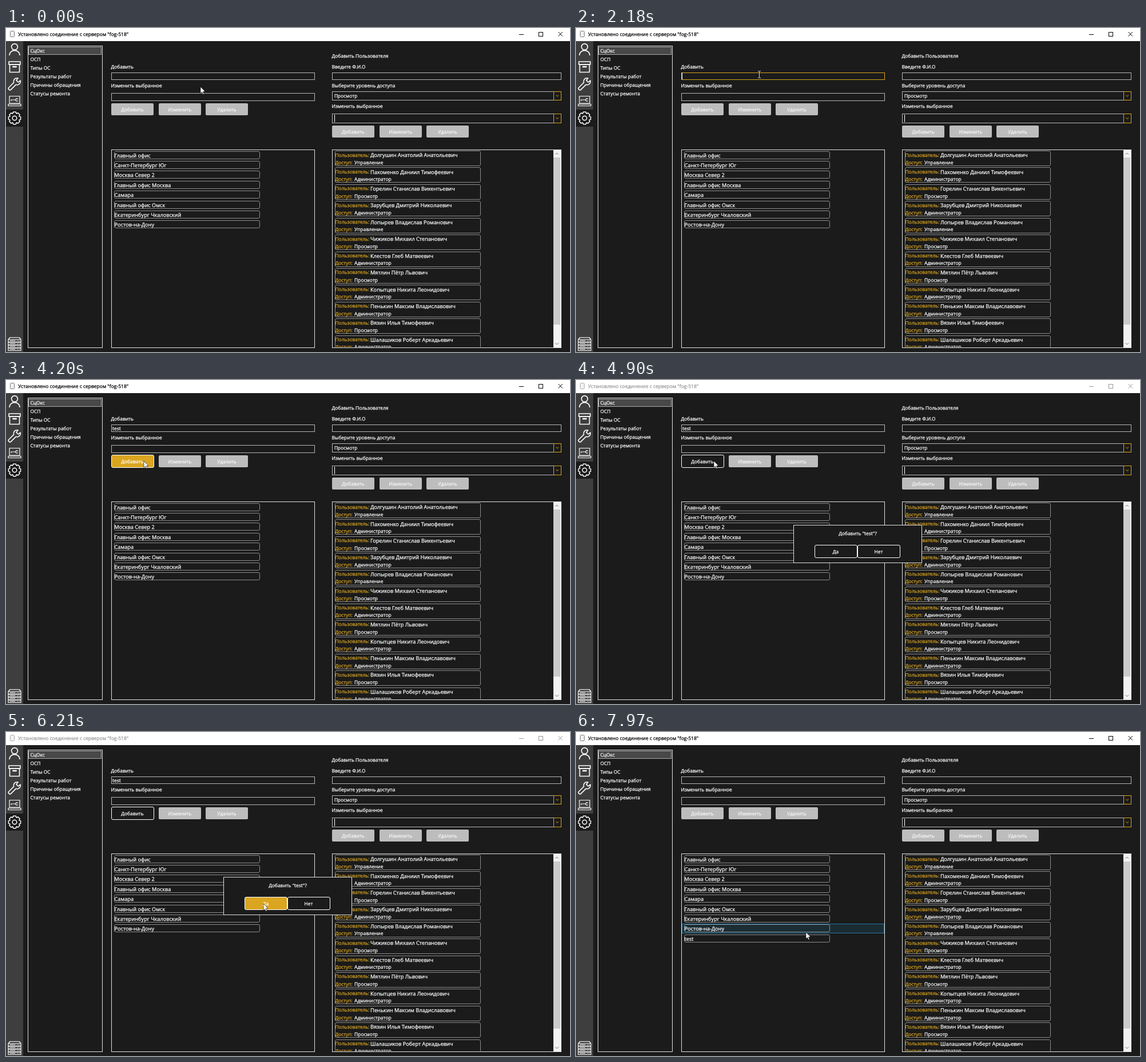
Animation, 986 px wide and 568 px high, one loop 8000 ms. Source, as an HTML page with a canvas:

```html
<!DOCTYPE html>
<html lang="ru">
<head>
<meta charset="utf-8">
<title>Настройки</title>
<style>
html, body { margin: 0; width: 100%; height: 100%; overflow: hidden; background: #1b1b1b; }
canvas { display: block; }
</style>
</head>
<body>
<canvas id="stage" width="986" height="568"></canvas>
<script>
const ctx = document.getElementById('stage').getContext('2d');
const LOOP = 8000;
const BG = '#1b1b1b', WHITE = '#fff', GOLD = '#daa520', FRAME = '#8c8c8c';
const FIELD = '#b8b8b8', PANEL = '#e2e2e2';
const SMALL = 8.4, LARGE = 9.2;
const ROW = 17.4, ROW_TOP = 214.5;

const menu = ['СцОкс', 'ОСП', 'Типы ОС', 'Результаты работ', 'Причины обращения', 'Статусы ремонта'];
const offices = ['Главный офис', 'Санкт-Петербург Юг', 'Москва Север 2', 'Главный офис Москва', 'Самара',
  'Главный офис Омск', 'Екатеринбург Чкаловский', 'Ростов-на-Дону'];
const actions = ['Добавить', 'Изменить', 'Удалить'];
const roles = { a: 'Администратор', m: 'Управление', v: 'Просмотр' };
const users = [
  ['Долгушин Анатолий Анатольевич', 'm'], ['Пахоменко Даниил Тимофеевич', 'a'],
  ['Горелин Станислав Викентьевич', 'v'], ['Зарубцев Дмитрий Николаевич', 'a'],
  ['Лопырев Владислав Романович', 'm'], ['Чижиков Михаил Степанович', 'v'],
  ['Клестов Глеб Матвеевич', 'a'], ['Мятлин Пётр Львович', 'v'],
  ['Копытцев Никита Леонидович', 'a'], ['Пенькин Максим Владиславович', 'a'],
  ['Вязин Илья Тимофеевич', 'v'], ['Шалашиков Роберт Аркадьевич', 'a']
];

// time, x, y of the pointer
const pointerKeys = [
  [0, 340, 103], [29, 340, 103], [30, 339, 101], [400, 339, 101], [700, 321, 87], [1040, 321, 87],
  [1100, 320, 81], [3560, 320, 81], [3900, 257, 139], [4200, 241, 142], [5550, 241, 142],
  [5950, 448, 308], [6210, 450, 301], [7650, 450, 301], [7970, 402, 351], [8000, 402, 351]
];
const typed = [[2240, 't'], [2320, 'te'], [2420, 'tes'], [2540, 'test'], [6920, '']];

const within = (t, a, b) => t >= a && t < b;
const clamp = v => Math.max(0, Math.min(1, v));
const ease = u => u * u * (3 - 2 * u);

function pointerAt(t) {
  const i = Math.max(1, pointerKeys.findIndex(k => k[0] > t));
  const [t0, x0, y0] = pointerKeys[i - 1], [t1, x1, y1] = pointerKeys[i];
  const u = ease(clamp((t - t0) / (t1 - t0)));
  return { x: x0 + (x1 - x0) * u, y: y0 + (y1 - y0) * u };
}

// a hairline stroke gives the small type its weight
function text(str, x, cy, color = WHITE, size = SMALL, align = 'left') {
  ctx.font = `${size}px "Open Sans", "Noto Sans", sans-serif`;
  ctx.textRendering = 'geometricPrecision';
  ctx.textAlign = align;
  ctx.fillStyle = ctx.strokeStyle = color;
  ctx.lineWidth = .25;
  ctx.fillText(str, x, cy + 3);
  ctx.strokeText(str, x, cy + 3);
}

function fill(x, y, w, h, color) {
  ctx.fillStyle = color;
  ctx.fillRect(x, y, w, h);
}

// one-pixel frame, right and bottom edges included
function frame(x, y, r, b, color = WHITE) {
  ctx.strokeStyle = color;
  ctx.lineWidth = 1;
  ctx.strokeRect(x + .5, y + .5, r - x, b - y);
}

function rounded(x, y, w, h, radius, stroke, back) {
  ctx.beginPath();
  ctx.roundRect(x, y, w, h, radius);
  if (back) { ctx.fillStyle = back; ctx.fill(); }
  if (stroke) { ctx.strokeStyle = stroke; ctx.lineWidth = 1; ctx.stroke(); }
}

function lines(points, color, width = 1) {
  ctx.beginPath();
  points.forEach(([x, y], i) => i ? ctx.lineTo(x, y) : ctx.moveTo(x, y));
  ctx.strokeStyle = color;
  ctx.lineWidth = width;
  ctx.stroke();
}

function button(x, y, label, state) {
  if (state === 'off') rounded(x, y, 74, 21, 2, null, '#bdbdbd');
  else rounded(x + .5, y - .5, 74, 22, 2.5, WHITE, state === 'hover' ? GOLD : BG);
  text(label, x + 37, y + 11, state === 'off' ? '#f6f6f6' : WHITE, SMALL, 'center');
}

function titleBar(active) {
  const ink = active ? '#000' : '#999';
  fill(0, 0, 986, 23, WHITE);
  rounded(7.5, 5.5, 7, 10, 1, active ? '#777' : '#aaa', '#f4f4ee');
  text('Установлено соединение с сервером "fog-518"', 21, 11, ink, 8.5);
  lines([[897, 11.5], [905, 11.5]], ink);
  frame(931, 7, 938, 14, ink);
  lines([[965.5, 7], [973, 14.5]], ink);
  lines([[973, 7], [965.5, 14.5]], ink);
}

function gear(cx, cy) {
  ctx.beginPath();
  for (let k = 0; k < 8; k++) {
    const a = k * Math.PI / 4;
    for (const [da, r] of [[-.33, 8.9], [-.22, 10.9], [.22, 10.9], [.33, 8.9]])
      ctx.lineTo(cx + r * Math.cos(a + da), cy + r * Math.sin(a + da));
  }
  ctx.closePath();
  ctx.stroke();
  ctx.beginPath();
  ctx.arc(cx, cy, 3.8, 0, 7);
  ctx.stroke();
}

function wrench(cx, cy) {
  ctx.save();
  ctx.translate(cx, cy);
  ctx.rotate(-Math.PI / 4);
  ctx.beginPath();
  ctx.arc(7.5, 0, 6, .45 - Math.PI, -.5);
  ctx.lineTo(8, -2.4);
  ctx.lineTo(8, 2.4);
  ctx.arc(7.5, 0, 6, .5, Math.PI - .45);
  ctx.lineTo(-10, 2.6);
  ctx.arc(-10, 0, 2.6, Math.PI / 2, Math.PI * 1.5);
  ctx.closePath();
  ctx.stroke();
  ctx.restore();
}

function sidebar() {
  fill(0, 23, 30, 545, '#3e3e3e');
  fill(0, 143, 30, 30, BG);
  ctx.strokeStyle = WHITE;
  ctx.lineWidth = 1.6;
  ctx.lineJoin = 'round';
  ctx.beginPath();
  ctx.arc(15, 33, 5.4, 0, 7);
  ctx.stroke();
  ctx.beginPath();
  ctx.moveTo(6, 48);
  ctx.bezierCurveTo(6, 36.5, 24, 36.5, 24, 48);
  ctx.stroke();

  ctx.strokeRect(5, 59, 20, 5);
  ctx.strokeRect(6.5, 64, 17, 13.5);
  ctx.strokeRect(12, 67.5, 6, 1);
  wrench(14, 99);

  ctx.lineWidth = 1.2;
  ctx.strokeRect(6, 119.5, 18, 12.5);
  ctx.strokeRect(4, 133.5, 22, 3);
  ctx.beginPath();
  ctx.arc(19, 126, 2.2, .6, 5.7);
  ctx.moveTo(16.8, 126);
  ctx.lineTo(9, 126);
  ctx.lineTo(9, 128);
  ctx.stroke();

  ctx.lineWidth = 1.5;
  gear(15, 158);

  ctx.lineWidth = 1.2;
  ctx.beginPath();
  ctx.moveTo(4, 546);
  ctx.lineTo(7, 542.5);
  ctx.lineTo(23, 542.5);
  ctx.lineTo(26, 546);
  ctx.stroke();
  for (let i = 0; i < 4; i++) {
    const y = 546 + i * 5;
    ctx.strokeRect(4, y, 22, 4.5);
    fill(6.5, y + 1.6, 10, 1.2, WHITE);
    fill(19, y + 1.6, 1.5, 1.2, WHITE);
    fill(22, y + 1.6, 1.5, 1.2, WHITE);
  }
  ctx.lineJoin = 'miter';
}

function menuPanel() {
  frame(38, 31, 168, 560, PANEL);
  fill(39, 33, 128, 14, '#484848');
  frame(39, 33, 166, 46, '#a8a8a8');
  menu.forEach((m, i) => text(m, 42.5, 40 + i * 15));
}

function dropButton(y, b) {
  frame(957, y, 970, b, GOLD);
  const c = (y + b) / 2;
  lines([[961.5, c - .8], [963.7, c + 1.4], [966, c - .8]], GOLD);
}

function userPanel() {
  text('Добавить Пользователя', 569.5, 48.5);
  text('Введите Ф.И.О', 569.5, 68);
  frame(570, 78, 970, 90, FIELD);
  text('Выберите уровень доступа', 569.5, 101);
  frame(570, 111, 970, 126, FIELD);
  text('Просмотр', 574, 118.5);
  dropButton(111, 126);
  text('Изменить выбранное', 569.5, 137);
  frame(570, 150, 970, 166, FIELD);
  fill(574, 152, 1, 13, WHITE);
  dropButton(150, 166);
  actions.forEach((s, i) => button(Math.round(570.4 + i * 82.5), 171, s, 'off'));

  ctx.save();
  ctx.beginPath();
  ctx.rect(570, 213, 387, 346.5);
  ctx.clip();
  users.forEach(([name, role], i) => {
    const y = 216 + i * 29.42;
    rounded(575.5, Math.round(y) - .5, 254, 26, 2.5, FRAME);
    text('Пользователь:', 575.5, y + 6.5, GOLD);
    text(name, 637, y + 7.2, WHITE, LARGE);
    text('Доступ:', 575.5, y + 19.8, GOLD);
    text(roles[role], 609, y + 19.8, WHITE, 8.5);
  });
  ctx.restore();

  fill(957, 214, 13, 346, '#f3f3f3');
  fill(957, 227, 12, 293, '#cbcbcb');
  lines([[960.5, 222], [963.3, 219], [966, 222]], '#777');
  lines([[960.5, 552], [963.3, 555], [966, 552]], '#777');
  frame(570, 213, 970, 560, PANEL);
}

function officePanel(t, p, dialogOpen) {
  const entry = typed.reduce((s, [at, v]) => t >= at ? v : s, '');
  const focused = within(t, 1100, 4180);
  text('Добавить', 183.5, 68);
  frame(184, 78, 539, 90, focused ? GOLD : FIELD);
  text(entry, 186, 84.5);
  const caret = within(t, 1100, 1690) || within(t, 2180, 3190) || within(t, 3720, 4180);
  if (caret) fill(185 + [0, 3, 8, 12, 15][entry.length], 78, 1, 12, WHITE);
  text('Изменить выбранное', 183.5, 101);
  frame(184, 114, 539, 127, FIELD);

  const over = p.x < 256.5 && p.x > 183 && p.y > 131 && p.y < 154;
  const addState = !entry ? 'off' : over && !dialogOpen ? 'hover' : 'on';
  actions.forEach((s, i) => button(Math.round(184.2 + i * 82.5), 132, s, i ? 'off' : addState));

  frame(184, 213, 539, 560, PANEL);
  const list = t >= 7470 ? [...offices, 'test'] : offices;
  const hot = t >= 7010 ? Math.floor((p.y - ROW_TOP) / ROW) : -1;
  list.forEach((name, i) => {
    const y = ROW_TOP + i * ROW;
    rounded(189.5, Math.round(y + 1) + .5, 254, 13, 2.5, FRAME);
    if (i === hot) {
      const top = Math.round(y);
      fill(185, top, 354, 17, 'rgba(38,160,218,.12)');
      frame(185, top, 538, top + 16, 'rgba(38,160,218,.66)');
    }
    text(name, 189.5, y + 9, WHITE, LARGE);
  });
}

function dialog(t, p) {
  const show = clamp((t - 4660) / 220) * (1 - clamp((t - 6920) / 90));
  if (!show) return;
  const scale = .92 + .08 * ease(show);
  ctx.save();
  ctx.globalAlpha = ease(show);
  ctx.translate(492.5, 287.5);
  ctx.scale(scale, scale);
  ctx.translate(-492.5, -287.5);
  fill(380, 254, 225, 66, BG);
  frame(380, 254, 604, 320, PANEL);
  text('Добавить "test"?', 492.5, 269, WHITE, SMALL, 'center');
  const over = p.x > 417 && p.x < 492 && p.y > 289 && p.y < 313;
  button(417, 290, 'Да', over ? 'hover' : 'on');
  button(492, 290, 'Нет', 'on');
  ctx.restore();
}

function arrow(x, y) {
  ctx.save();
  ctx.translate(x, y);
  ctx.beginPath();
  for (const [px, py] of [[0, 0], [0, 11.5], [2.6, 9.2], [4.4, 13.3], [6.2, 12.5], [4.5, 8.5], [8, 8.2]])
    ctx.lineTo(px, py);
  ctx.closePath();
  ctx.fillStyle = WHITE;
  ctx.fill();
  ctx.strokeStyle = '#000';
  ctx.lineWidth = .6;
  ctx.stroke();
  ctx.restore();
}

function beam(x, y) {
  x = Math.round(x);
  y = Math.round(y);
  fill(x, y - 5, 1, 11, '#ddd');
  for (const row of [y - 6, y + 6]) {
    fill(x - 2, row, 2, 1, '#ddd');
    fill(x + 1, row, 2, 1, '#ddd');
  }
}

function draw(t) {
  const p = pointerAt(t);
  const dialogOpen = within(t, 4660, 6920);
  fill(0, 0, 986, 568, BG);
  titleBar(!dialogOpen);
  sidebar();
  menuPanel();
  officePanel(t, p, dialogOpen);
  userPanel();
  dialog(t, p);
  // the pointer hides while typing
  if (within(t, 2240, 3560)) return;
  const inField = p.y > 77 && p.y < 91;
  (inField ? beam : arrow)(p.x, p.y);
}

const start = performance.now();
function tick() {
  draw((performance.now() - start) % LOOP);
  requestAnimationFrame(tick);
}
tick();
</script>
</body>
</html>
```
